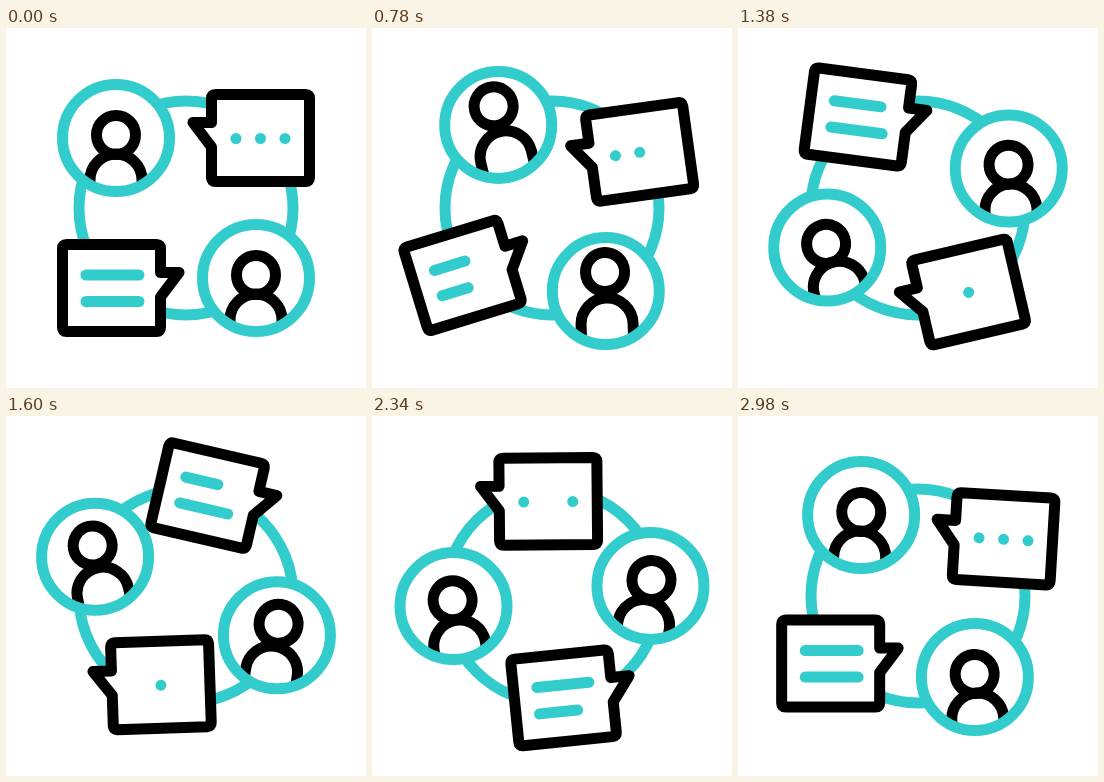
Animation, 360 px wide and 360 px high, one loop 3 s. Source, as an HTML page:

```html
<!DOCTYPE html>
<html>
<head>
<meta charset="utf-8">
<style>
  html, body { margin: 0; width: 100%; height: 100%; overflow: hidden; background: #fff; }
  svg { display: block; width: 100vw; height: 100vh; }
  .line { fill: none; stroke-width: 11; stroke-linecap: round; stroke-linejoin: round; }
  .teal { stroke: #33cccc; }
  .black { stroke: #000; }
  .paper { fill: #fff; }
</style>
</head>
<body>
<svg viewBox="0 0 360 360">
  <defs>
    <clipPath id="face"><circle r="54"/></clipPath>
    <path id="bubble" class="line black paper" d="M-35.5-43.5H54.5Q58.5-43.5 58.5-39.5V39.5Q58.5 43.5 54.5 43.5H-35.5Q-39.5 43.5-39.5 39.5V9L-58-15.5H-39.5V-39.5Q-39.5-43.5-35.5-43.5Z"/>
    <g id="avatar">
      <circle class="paper" r="54"/>
      <g clip-path="url(#face)">
        <g class="tilt">
          <path class="body line black" d="M-26 40V0A26 26 0 0 1 26 0V40"/>
          <circle class="head line black" r="19.5"/>
        </g>
      </g>
      <circle class="line teal" r="53.5"/>
    </g>
  </defs>
  <circle class="line teal" cx="180" cy="180" r="107"/>
  <g id="personA"></g>
  <g id="personB"></g>
  <g id="dots">
    <use href="#bubble"/>
    <g fill="#33cccc">
      <circle cx="-15" cy=".5" r="5.5"/>
      <circle cx="9.5" cy=".5" r="5.5"/>
      <circle cx="34" cy=".5" r="5.5"/>
    </g>
  </g>
  <g id="lines">
    <use href="#bubble" transform="scale(-1 1)"/>
    <path class="line teal"/>
  </g>
</svg>
<script>
const LOOP = 3000;
const $ = (selector, root = document) => root.querySelector(selector);

// Keys are [time, value] pairs, eased between neighbours and held at both ends.
function track(keys, t) {
  if (t <= keys[0][0]) return keys[0][1];
  for (let i = 1; i < keys.length; i++) {
    const [t0, a] = keys[i - 1], [t1, b] = keys[i];
    if (t < t1) {
      const u = (t - t0) / (t1 - t0);
      return a + (b - a) * u * u * (3 - 2 * u);
    }
  }
  return keys[keys.length - 1][1];
}

const ORBIT = [[0, 0], [400, -10], [3000, 370]];
const SWING = [[0, 0], [800, -17], [1600, 13], [2200, -9.5], [2600, 3.5], [3000, 0]];
const PULSE = [[0, 0], [600, 1], [1200, 0], [1800, 1], [2400, 0]];
const HIDDEN = [[970, 2150], [1780, 2600], [500, 1780]];

const people = ['#personA', '#personB'].map(id => {
  const el = $(id);
  for (const part of $('#avatar').children) el.append(part.cloneNode(true));
  return el;
});
const dots = $('#dots'), lines = $('#lines');
const dotList = dots.querySelectorAll('circle'), text = $('path', lines);

// Position on the orbit for a part whose resting place is (x, y).
function place(x, y, t) {
  const a = track(ORBIT, t) * Math.PI / 180, dx = x - 180, dy = y - 180;
  const px = 180 + dx * Math.cos(a) - dy * Math.sin(a);
  const py = 180 + dx * Math.sin(a) + dy * Math.cos(a);
  return `translate(${px} ${py})`;
}

const swing = (t, delay) => `rotate(${track(SWING, t - delay)})`;

function drawPerson(el, x, y, t, delay) {
  const lift = track(PULSE, t - 100);
  el.setAttribute('transform', place(x, y, t));
  $('.tilt', el).setAttribute('transform', swing(t, delay));
  $('.head', el).setAttribute('transform', `translate(0 ${-3 - 17 * lift})`);
  $('.body', el).setAttribute('transform', `translate(0 ${42 - 9.5 * lift})`);
}

function draw(t) {
  drawPerson(people[0], 110, 110, t, 200);
  drawPerson(people[1], 250, 250, t, 600);

  dots.setAttribute('transform', place(245, 110, t) + swing(t, 400));
  HIDDEN.forEach(([off, on], i) => {
    dotList[i].setAttribute('visibility', t >= off && t < on ? 'hidden' : 'visible');
  });

  lines.setAttribute('transform', place(115, 260, t) + swing(t, 0));
  const width = delay => 53 - 27 * track(PULSE, t - delay);
  text.setAttribute('d', `M-35-13h${width(0)}M-35 13.5h${width(260)}`);
}

const start = performance.now();
function tick() {
  draw((performance.now() - start) % LOOP);
  requestAnimationFrame(tick);
}
draw(0);
requestAnimationFrame(tick);
</script>
</body>
</html>
```
